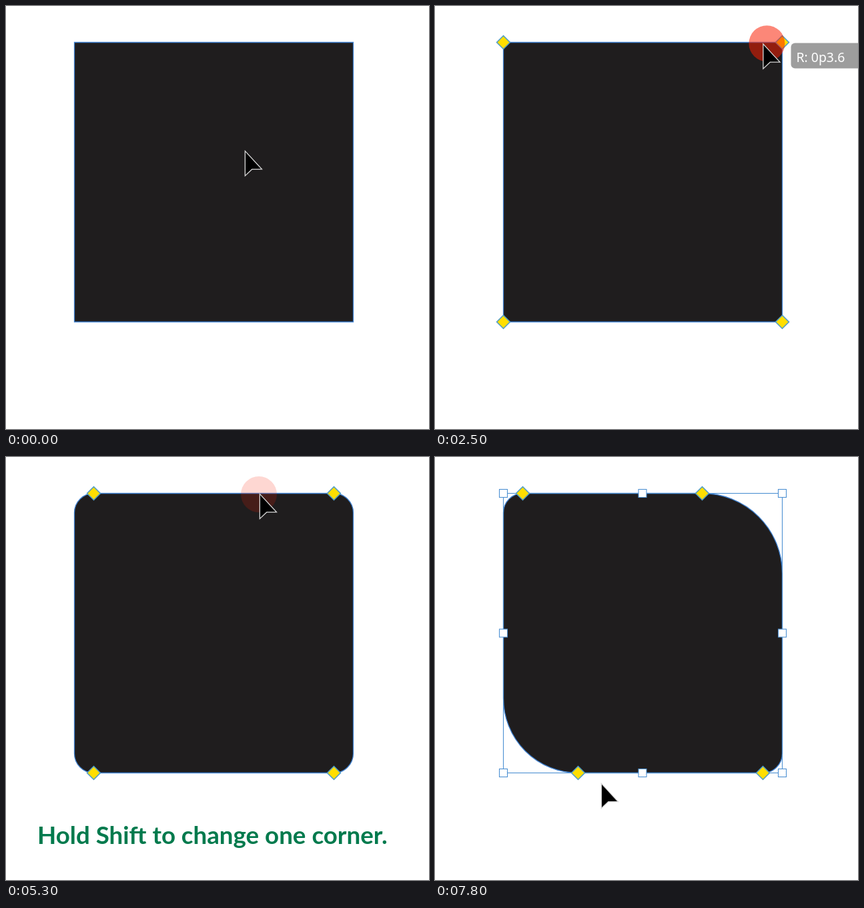
Animation of 634 by 634 pixels, one loop 7.9 s. Source, as an HTML page:

```html
<!DOCTYPE html>
<html lang="en">
<head>
<meta charset="utf-8">
<title>Corner editing</title>
<style>
html, body { margin: 0; width: 100%; height: 100%; overflow: hidden; background: #fff; }
svg { display: block; width: 634px; height: 634px; }
#hint { font: 700 36px Lato, sans-serif; fill: #007a4d; }
#tip text { font: 19.4px "Noto Sans", sans-serif; fill: #fff; }
</style>
</head>
<body>
<svg viewBox="0 0 634 634">
  <path id="shape" fill="#1f1d1e" stroke="#3f80cf" stroke-width="1.3"/>
  <g id="frame" fill="#fff" stroke="#4d90d2" stroke-width="1.1"></g>
  <g id="squares">
    <rect x="428.5" y="47" width="15" height="15" fill="#5c96e2"/>
    <rect x="513.5" y="95.5" width="13" height="13" fill="#ffde00" stroke="#4d90d2" stroke-width="2"/>
  </g>
  <g id="diamonds" fill="#ffde00" stroke="#4d9bc8" stroke-width="1.5"></g>
  <circle id="press" fill="#fa1e00"/>
  <path id="cursor" d="M2 3V37L11.5 28H25Z" stroke="#d6d6d6" stroke-width="2.6" paint-order="stroke"/>
  <g id="tip">
    <rect width="148" height="38" rx="6" fill="#444" fill-opacity=".52"/>
    <text x="8" y="28"></text>
  </g>
  <text id="hint" x="47" y="580">Hold Shift to change one corner.</text>
</svg>
<script>
const LOOP = 7900, STEP = 100, LAG = 65;
const L = 102.5, T = 54.5, R = 520.5, B = 473.5;
const $ = id => document.getElementById(id);

// start, end, x, y, bow: eased pointer moves
const moves = [
  [550, 1150, 521, 102, 0],
  [1650, 2050, 519, 50, 0],
  [2130, 2720, 478, 58, 0],
  [3500, 3800, 489, 55, 0],
  [4030, 4860, 379, 54, -6],
  [5300, 5780, 136, 476, 0],
  [5800, 6380, 248, 469, -8],
  [6900, 7400, 248, 488, 0]
];
// down, up, fade time, final radius
const presses = [
  [200, 200, 200, 45],
  [1300, 1400, 300, 45],
  [2200, 3000, 400, 64],
  [3800, 5100, 300, 27],
  [5900, 6600, 400, 64]
];

const clamp = v => Math.min(1, Math.max(0, v));
const ramp = (t, a, b) => clamp((t - a) / (b - a));
const within = (t, ...spans) => spans.some(([a, b]) => t >= a && t < b);
const show = (el, on) => el.setAttribute("visibility", on ? "visible" : "hidden");
const set = (el, attrs) => { for (const k in attrs) el.setAttribute(k, attrs[k]); };

function add(parent, name, attrs) {
  const el = document.createElementNS("http://www.w3.org/2000/svg", name);
  set(el, attrs);
  return parent.appendChild(el);
}

function pointer(t) {
  let x = 357, y = 216;
  for (const [a, b, nx, ny, bow] of moves) {
    if (t < a) break;
    const e = 0.5 - Math.cos(Math.PI * ramp(t, a, b)) / 2;
    x += (nx - x) * e;
    y += (ny - y) * e + bow * Math.sin(Math.PI * e);
  }
  return [x, y];
}

function corners(t) {
  const r = t >= 3300 ? 29 : 0;
  return [r, t >= 5500 ? 120 : r, r, t >= 7500 ? 112 : r];
}

function outline([a, b, c, d]) {
  const arc = (r, x, y) => `A${r} ${r} 0 0 1 ${x} ${y}`;
  return `M${L + a} ${T}H${R - b}${arc(b, R, T + b)}V${B - c}${arc(c, R - c, B)}` +
    `H${L + d}${arc(d, L, B - d)}V${T + a}${arc(a, L + a, T)}Z`;
}

function radiusText(x) {
  const pt = Math.max(0, Math.round((3.6 + (490.5 - x) / 7.85) * 10) / 10);
  const pica = Math.floor(pt / 12);
  return `R: ${pica}p${+(pt - pica * 12).toFixed(1)}`;
}

add($("frame"), "rect", { x: L, y: T, width: R - L, height: B - T, fill: "none" });
for (const x of [L, 311, R]) for (const y of [T, 264, B])
  if (x !== 311 || y !== 264)
    add($("frame"), "rect", { x: x - 6, y: y - 6, width: 12, height: 12 });
const gems = [0, 1, 2, 3].map(() => add($("diamonds"), "path", { d: "M0-10L10 0L0 10L-10 0Z" }));

function draw(t) {
  const r = corners(t), [x, y] = pointer(t);
  $("shape").setAttribute("d", outline(r));
  [[L + r[0], T], [R - r[1], T], [R - r[2], B], [L + r[3], B]].forEach((p, i) =>
    gems[i].setAttribute("transform", `translate(${p})`));
  show($("diamonds"), t >= 1500);
  show($("squares"), within(t, [300, 1500]));
  show($("frame"), within(t, [300, 2200], [3300, 3900], [5500, 6000], [7500, LOOP]));

  const hit = presses.find(([a, b, d]) => t >= a && t < b + d);
  show($("press"), hit);
  if (hit) {
    const k = ramp(t, hit[1], hit[1] + hit[2]), [cx, cy] = pointer(t - LAG);
    set($("press"), { cx, cy: cy + 2, r: 27 + (hit[3] - 27) * k, "fill-opacity": 0.53 * (1 - k) });
  }

  $("cursor").setAttribute("transform", `translate(${x} ${y})`);
  show($("tip"), within(t, [2300, 3100], [3900, 5200]));
  $("tip").setAttribute("transform", `translate(${x + 43} ${y})`);
  $("tip").lastElementChild.textContent = radiusText(x);
  $("hint").setAttribute("opacity", ramp(t, 3300, 3950) - ramp(t, 6900, 7600));
}

// size the caption to its line
$("hint").style.fontSize = 36 * 525 / $("hint").getComputedTextLength() + "px";

const start = performance.now();
function tick() {
  const t = (performance.now() - start) % LOOP;
  draw(Math.floor(t / STEP) * STEP);
  requestAnimationFrame(tick);
}
tick();
</script>
</body>
</html>
```
